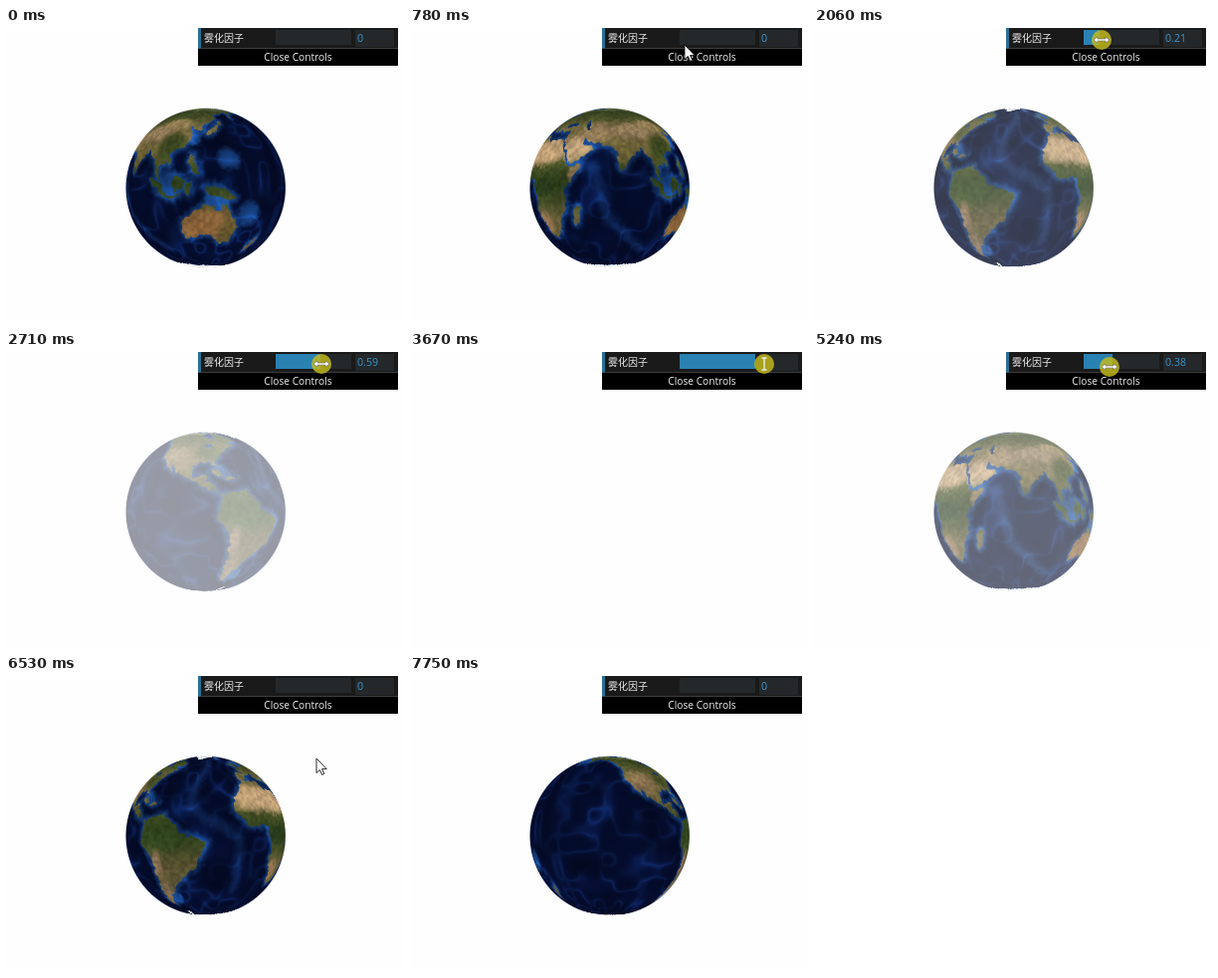
These frames come from a looping animation (400 px wide and 298 px high, 7.81 s). An HTML page with a canvas:

```html
<!DOCTYPE html>
<html lang="zh">
<head>
<meta charset="utf-8">
<title>Globe with fog control</title>
<style>
html, body { margin: 0; width: 100%; height: 100%; overflow: hidden; background: #fefefe; }
#stage { position: relative; width: 400px; height: 298px; overflow: hidden; }
#stage > * { position: absolute; }
#globe { left: 119px; top: 79px; }
#panel { left: 193px; top: 0; width: 201px; height: 38px; background: #000; color: #eee;
  font: 10.2px/17px "Open Sans", "Noto Sans", sans-serif; }
#panel > * { position: absolute; white-space: nowrap; }
.row { left: 0; top: 0; width: 198px; height: 20px; background: #1a1a1a;
  border-left: 3px solid #2a6f96; border-bottom: 1px solid #3c3c3c; }
.label { left: 6px; top: 1px; font: 10px/18px "Noto Sans CJK SC", "Noto Sans CJK", sans-serif; }
.slider { left: 78px; top: 2px; width: 76px; height: 15px; background: #24282b; }
#fill { height: 100%; background: #2a82b3; }
#value { left: 158px; top: 2px; width: 37px; height: 17px; padding-left: 2px;
  background: #24282b; color: #3c95cc; font-size: 10.6px; line-height: 16px; }
.close { left: 0; top: 21px; width: 201px; text-align: center; }
#over { left: 0; top: 0; }
</style>
</head>
<body>
<div id="stage">
  <canvas id="globe" width="164" height="164"></canvas>
  <div id="panel">
    <div class="row"></div>
    <div class="label">雾化因子</div>
    <div class="slider"><div id="fill"></div></div>
    <div id="value">0</div>
    <div class="close">Close Controls</div>
  </div>
  <svg id="over" width="400" height="298">
    <g id="cursor">
      <circle id="press" r="10" fill="#c6bc1c" opacity=".82"/>
      <path id="arrow" d="M0 0V14.5L3.4 11.4 5.6 16.4 7.8 15.4 5.6 10.6H10.2Z" fill="#fff" stroke="#111" stroke-width=".9"/>
      <path id="resize" d="M-8 0l4-3v2h8v-2l4 3-4 3v-2h-8v2z" fill="#fff" stroke="#555" stroke-width=".5"/>
      <path id="beam" d="M-2.5-6h5M0-6V6M-2.5 6h5" fill="none" stroke="#eee" stroke-width="1.3"/>
    </g>
  </svg>
</div>
<script>
const $ = id => document.getElementById(id);
const W = 720, H = 360, LOOP = 7810, STEP = LOOP / 121;

// Coastlines as lon, lat pairs
const africa = [-6,36, 10,37, 11,33, 20,31, 32,31, 37,21, 43,12, 51,12, 40,-3, 40,-15, 35,-20, 32,-29, 27,-34,
  19,-35, 12,-18, 13,-9, 9,0, 9,4, -8,4, -17,14, -16,21, -10,30];
const eurasia = [-9,37, -9,43, -2,44, -4,48, 8,54, 9,57, 20,55, 30,60, 22,61, 24,65, 18,62, 13,56, 5,60, 14,68,
  26,71, 44,66, 70,73, 105,77, 140,72, 190,67, 163,60, 157,51, 156,60, 138,54, 140,48, 128,40, 128,35, 118,39,
  122,31, 117,23, 107,20, 109,12, 101,13, 103,2, 98,10, 94,17, 89,22, 80,14, 77,8, 72,20, 66,25, 57,26, 49,30,
  51,25, 59,22, 45,13, 39,21, 34,30, 36,37, 27,37, 23,40, 22,37, 14,45, 18,40, 16,38, 9,44, 0,40, -5,36];
const northAmerica = [-168,66, -156,71, -115,68, -82,69, -94,59, -80,52, -77,62, -65,59, -56,52, -66,50, -61,46,
  -70,43, -76,36, -81,31, -80,25, -84,30, -97,28, -96,19, -88,21, -88,16, -83,14, -82,9, -78,7, -94,16, -105,20,
  -113,31, -110,23, -121,35, -124,47, -135,58, -150,60, -163,55, -158,59];
const southAmerica = [-78,8, -62,11, -50,0, -35,-6, -39,-15, -41,-22, -48,-26, -58,-36, -65,-43, -69,-52, -66,-55,
  -74,-50, -71,-20, -81,-5, -77,5];
const australia = [114,-23, 130,-12, 136,-12, 136,-16, 140,-17, 142,-11, 153,-26, 149,-38, 142,-38, 131,-31, 116,-35];
const greenland = [-60,80, -20,80, -22,70, -44,60, -54,70];
const atlanticRidge = [-30,58, -42,28, -45,15, -14,-2, -14,-40];
const indianRidge = [58,14, 68,-22, 100,-48];

// Ellipses: lon, lat, rx, ry, turn
const islands = [[47,-19,2,7,-15], [114,1,4,5,-30], [101,-1,2,8,45], [110,-7,5,1,-5], [121,-2,2,4,0],
  [140,-5,10,3,-20], [136,36,2,7,-45], [143,44,2,2,0], [124,12,2,7,20], [172,-41,2,8,-35], [-2,54,2,5,15],
  [-8,53,2,2,0], [-19,65,4,1,0], [-80,22,5,1,-18], [-71,19,3,1,0], [-76,68,11,4,-40], [-111,71,7,2,0]];
const lakes = [[51,42,2,5,0], [34,43,6,2,0], [-85,45,4,2,0]];

// Soft spots: lon, lat, rx, ry, colour
const biomes = [[-2,23,22,12,'#caa77c'], [20,23,24,12,'#c9a67d'], [46,23,15,11,'#c2a27c'], [60,36,16,10,'#9c825d'],
  [86,37,22,9,'#9b825f'], [105,43,17,8,'#9a8258'], [78,20,8,9,'#756839'], [108,24,14,13,'#36451d'],
  [20,0,15,8,'#26391a'], [48,6,7,8,'#8f7350'], [18,-25,10,9,'#947150'], [130,-25,24,13,'#8f6339'],
  [147,-31,8,13,'#64552c'], [-109,34,13,13,'#8d7450'], [-85,38,13,9,'#3a4721'], [-61,-4,17,10,'#31451e'],
  [-69,-20,5,12,'#927558'], [-68,-42,7,13,'#7f694d'], [-95,71,38,7,'#8b8d80']];
const shelves = [[109,1,10], [138,-10,9], [122,30,7], [3,56,7], [-172,60,9], [-77,23,6], [-63,-46,8], [160,-18,10],
  [146,16,9]];
const climate = ['#8b8d84', '#68704e', '#34411f', '#454b26', '#6c633b', '#75663f', '#6b6338', '#3d4a21', '#2c3f1b',
  '#414a25', '#5f5734', '#5f5734', '#5b543f'];

const rnd = (x, y) => { const s = Math.sin(x * 127.1 + y * 311.7) * 43758.5453; return s - Math.floor(s); };
function noise(u, v, size) {
  const p = W / size, x = u / size, y = v / size, i = Math.floor(x), j = Math.floor(y);
  const ease = a => a * a * (3 - 2 * a), fx = ease(x - i), fy = ease(y - j);
  const a = i % p, b = (i + 1) % p;
  const top = rnd(a, j) + (rnd(b, j) - rnd(a, j)) * fx;
  const low = rnd(a, j + 1) + (rnd(b, j + 1) - rnd(a, j + 1)) * fx;
  return top + (low - top) * fy;
}

function layer() {
  const c = document.createElement('canvas');
  c.width = W; c.height = H;
  const g = c.getContext('2d', { willReadFrequently: true });
  g.setTransform(2, 0, 0, -2, W / 2, H / 2);
  g.lineJoin = 'round';
  return g;
}
function addShape(path, pts, closed = true) {
  for (const off of [-360, 0]) {
    for (let i = 0; i < pts.length; i += 2) path[i ? 'lineTo' : 'moveTo'](pts[i] + off, pts[i + 1]);
    if (closed) path.closePath();
  }
}
function addEllipse(path, [x, y, rx, ry, turn]) {
  const a = turn * Math.PI / 180;
  path.moveTo(x + rx * Math.cos(a), y + rx * Math.sin(a));
  path.ellipse(x, y, rx, ry, a, 0, 2 * Math.PI);
}
function blob(g, [x, y, rx, ry, color], alpha) {
  g.save();
  g.translate(x, y);
  g.scale(rx, ry);
  const grad = g.createRadialGradient(0, 0, 0, 0, 0, 1);
  grad.addColorStop(0, color);
  grad.addColorStop(.6, color + 'd0');
  grad.addColorStop(1, color + '00');
  g.globalAlpha = alpha;
  g.fillStyle = grad;
  g.fillRect(-1, -1, 2, 2);
  g.restore();
}

function buildMap() {
  const coast = new Path2D(), ice = new Path2D(), water = new Path2D(), ridges = new Path2D();
  [africa, eurasia, northAmerica, southAmerica, australia].forEach(s => addShape(coast, s));
  islands.forEach(e => addEllipse(coast, e));
  lakes.forEach(e => addEllipse(water, e));
  addShape(ridges, atlanticRidge, false);
  addShape(ridges, indianRidge, false);
  addShape(ice, greenland);
  addEllipse(ice, [-62, -68, 3, 6, -30]);
  ice.moveTo(-180, -90);
  for (let lon = -180; lon <= 180; lon += 5) ice.lineTo(lon, -70 + 4 * Math.cos((lon - 80) * Math.PI / 180));
  ice.lineTo(180, -90);

  const land = layer();
  land.fill(coast);
  land.globalCompositeOperation = 'source-atop';
  const grad = land.createLinearGradient(0, 80, 0, -40);
  climate.forEach((c, i) => grad.addColorStop(i / (climate.length - 1), c));
  land.fillStyle = grad;
  land.fillRect(-180, -90, 360, 180);
  biomes.forEach(b => blob(land, b, .95));

  const g = layer();
  g.fillStyle = '#040b29';
  g.fillRect(-180, -90, 360, 180);
  g.filter = 'blur(4px)';
  g.strokeStyle = 'rgba(28,72,140,.5)';
  g.lineWidth = 4;
  g.stroke(ridges);
  g.filter = 'none';
  shelves.forEach(([x, y, r]) => blob(g, [x, y, r, r, '#1c519a'], .75));
  g.filter = 'blur(3px)';
  g.strokeStyle = '#1b4f97';
  g.lineWidth = 3;
  g.stroke(coast);
  g.filter = 'none';
  g.save();
  g.resetTransform();
  g.drawImage(land.canvas, 0, 0);
  g.restore();
  g.fillStyle = '#0c2856';
  g.fill(water);
  g.filter = 'blur(1px)';
  g.fillStyle = '#e9eef2';
  g.fill(ice);

  // Roughen coasts and mottle the surface
  const src = g.getImageData(0, 0, W, H).data, out = new Float32Array(W * H * 3);
  for (let v = 0, o = 0; v < H; v++) for (let u = 0; u < W; u++, o += 3) {
    const n = noise(u, v, 4), m = noise(u, v + 500, 4), big = noise(u, v + 90, 24);
    const mid = noise(u, v + 800, 10) - .5;
    const x = (u + Math.round((n - .5) * 4 + mid * 4) + W) % W;
    const y = Math.min(H - 1, Math.max(0, v + Math.round((m - .5) * 4 - mid * 4)));
    const k = (y * W + x) * 4, sea = src[k + 2] > src[k] + 12;
    const ridge = sea ? (1 - Math.abs(2 * noise(u, v + 40, 18) - 1)) ** 5 * big : 0;
    const gain = sea ? .8 + .4 * big : .74 + .3 * n + .22 * big;
    out[o] = src[k] * gain + ridge * 10;
    out[o + 1] = src[k + 1] * gain + ridge * 30;
    out[o + 2] = src[k + 2] * gain + ridge * 62;
  }
  return out;
}

const map = buildMap();
const ctx = $('globe').getContext('2d'), image = ctx.createImageData(164, 164);

// Perspective view of a unit sphere: texture position of every visible pixel
const view = [];
{
  const R = 80.2, D = 5, F = R * Math.sqrt(D * D - 1), tilt = -2 * Math.PI / 180;
  for (let j = 0; j < 164; j++) for (let i = 0; i < 164; i++) {
    const dx = i + .5 - 81.7, dy = j + .5 - 82, cover = Math.min(1, R - Math.hypot(dx, dy) + .5);
    if (cover <= 0) continue;
    const sx = dx / F, sy = -dy / F, a = sx * sx + sy * sy + 1;
    const k = (D - Math.sqrt(Math.max(0, D * D - a * (D * D - 1)))) / a;
    const x = sx * k, y = sy * k, z = D - k;
    const y2 = y * Math.cos(tilt) + z * Math.sin(tilt), z2 = z * Math.cos(tilt) - y * Math.sin(tilt);
    const lat = Math.asin(Math.max(-1, Math.min(1, y2)));
    view.push({ at: (j * 164 + i) * 4, u: Math.atan2(x, z2) * 360 / Math.PI,
      v: Math.min(H - 2, 180 - lat * 360 / Math.PI), alpha: cover * 255 });
  }
}

function drawGlobe(lon) {
  const px = image.data, shift = (lon + 180) * 2, down = W * 3;
  for (const p of view) {
    const u = ((p.u + shift) % W + W) % W, i = Math.floor(u) % W, j = Math.floor(p.v);
    const fx = u - Math.floor(u), fy = p.v - j;
    const a = (j * W + i) * 3, b = (j * W + (i + 1) % W) * 3;
    for (let c = 0; c < 3; c++) {
      const top = map[a + c] * (1 - fx) + map[b + c] * fx;
      const low = map[a + down + c] * (1 - fx) + map[b + down + c] * fx;
      px[p.at + c] = top + (low - top) * fy;
    }
    px[p.at + 3] = p.alpha;
  }
  ctx.putImageData(image, 0, 0);
}

// Keys: time, then values
const pointer = [[190,372,298], [520,332,172], [650,310,52], [774,276,17], [1000,272,12], [1450,272,11],
  [2065,289,12], [3400,347,12], [3600,356,12], [4400,356,12], [4650,346,12], [4800,346,12], [5228,297,15],
  [5500,270,14], [5690,273,14], [5950,383,20], [6200,345,30], [6519,312,83], [6750,336,165], [7050,188,268],
  [7240,172,298]];
const fog = [[1450,0], [1700,.04], [2065,.21], [3400,1], [4800,1], [5228,.38], [5500,0]];
function track(keys, t) {
  const n = keys.findIndex(k => k[0] > t);
  if (n < 0) return keys[keys.length - 1].slice(1);
  if (!n) return keys[0].slice(1);
  const a = keys[n - 1], b = keys[n], f = (t - a[0]) / (b[0] - a[0]);
  return a.slice(1).map((v, i) => v + (b[i + 1] - v) * f);
}
const show = (id, on) => $(id).setAttribute('visibility', on ? 'visible' : 'hidden');

function draw(t) {
  const [x, y] = track(pointer, t), [f] = track(fog, t);
  drawGlobe(130.8 - t * .0807);
  $('globe').style.opacity = 1 - f;
  $('fill').style.width = f * 100 + '%';
  $('value').textContent = +f.toFixed(2);

  const here = t >= 190 && t < 7240, inRow = here && y < 16.5;
  $('cursor').setAttribute('transform', `translate(${x} ${y})`);
  show('press', (t > 1150 && t < 4120) || (t > 4640 && t < 5640));
  show('resize', inRow && x < 347.5);
  show('beam', inRow && x >= 347.5);
  show('arrow', here && !inRow);
}

const start = performance.now();
let last = -1;
function tick() {
  const t = (performance.now() - start) % LOOP, n = Math.floor(t / STEP + .2) % 121;
  if (n !== last) draw(n * STEP);
  last = n;
  requestAnimationFrame(tick);
}
tick();
</script>
</body>
</html>
```
